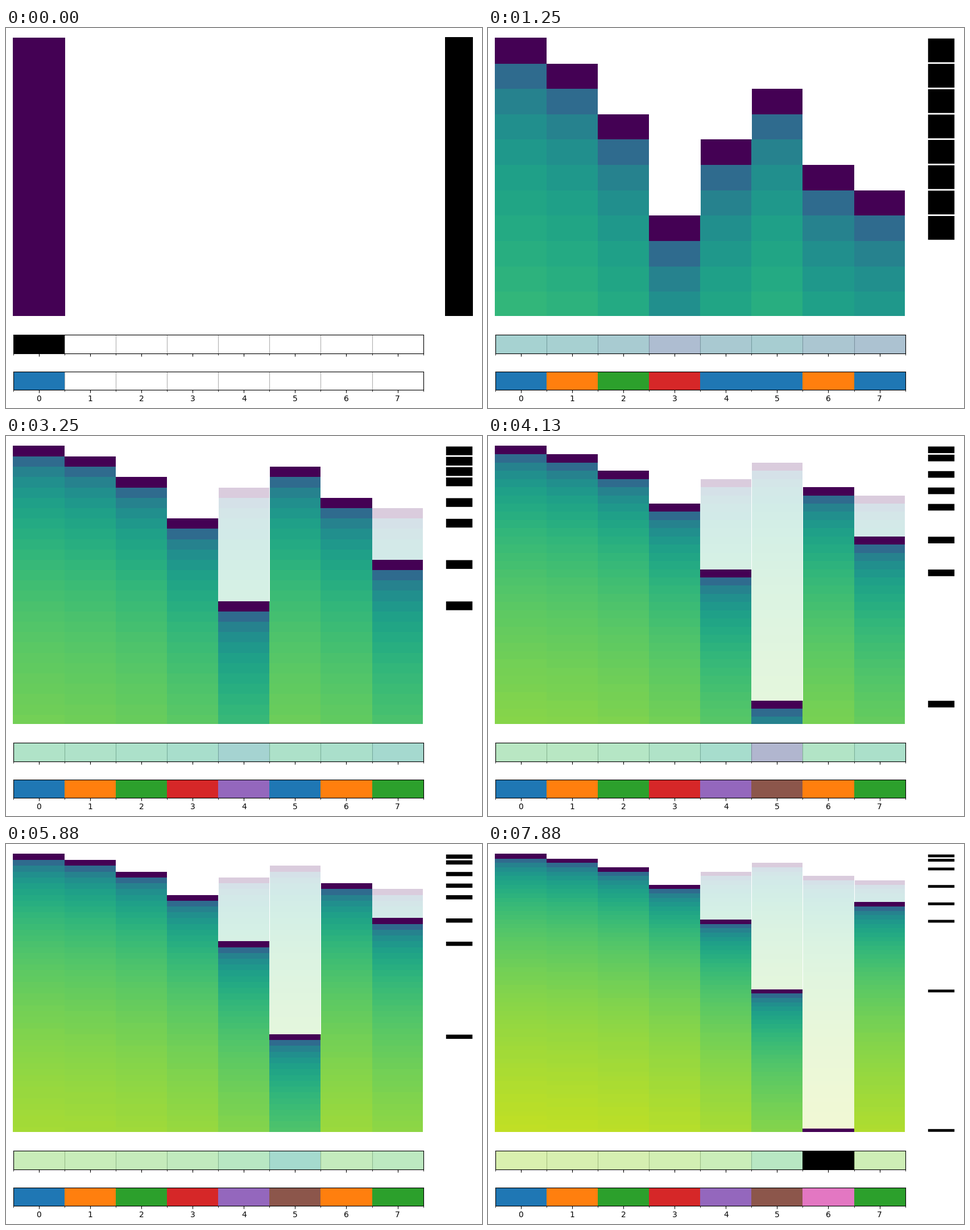
Recreate the animation shown at these times as a matplotlib script. Size 837 by 669 pixels, loop 8000 ms.

```python
import matplotlib.pyplot as plt
import numpy as np
from matplotlib.animation import FuncAnimation
from matplotlib.colors import LogNorm, SymLogNorm
from matplotlib.patches import Rectangle

W, H, DPI = 837, 669, 100
SLOTS, STEPS = 8, 64

# step -> slot written at that step; all other steps are discarded
WRITES = {0: 0, 1: 1, 2: 5, 3: 2, 4: 4, 5: 6, 6: 7, 7: 3,
          11: 7, 15: 4, 31: 5, 63: 6}

LEFT, RIGHT, TOP, BOTTOM = 12.6, 733.7, 17, 507
SPAN = 491
EDGES = np.round(np.linspace(LEFT, RIGHT, SLOTS + 1))
EDGES[[0, -1]] = 12, 733

viridis, tab10 = plt.get_cmap("viridis"), plt.get_cmap("tab10")
cell_norm = SymLogNorm(linthresh=1, vmin=0, vmax=127, base=10)
strip_norm = LogNorm(vmin=1, vmax=128)
cell_colors = viridis(cell_norm(np.arange(STEPS)))[:, :3]

fig = plt.figure(figsize=((W + 0.001) / DPI, (H + 0.001) / DPI), dpi=DPI,
                 facecolor="white")
stage = fig.add_axes([0, 0, 1, 1])
stage.set(xlim=(0, W), ylim=(H, 0))
stage.axis("off")


def make_strip(top, bottom, labels):
    ax = fig.add_axes([LEFT / W, 1 - bottom / H,
                       (RIGHT - LEFT) / W, (bottom - top) / H])
    ax.set_facecolor("none")
    ax.set_axisbelow(True)
    ax.set_yticks([])
    ax.set_xticks(range(SLOTS))
    ax.set_xticks(np.arange(SLOTS + 1) - 0.5, minor=True)
    ax.tick_params(labelbottom=labels, pad=2.7)
    ax.grid(True, which="minor", axis="x", color="#b0b0b0", lw=0.8)
    bars = ax.bar(range(SLOTS), 1, width=1, color="none", lw=0)
    ax.set(xlim=(-0.5, SLOTS - 0.5), ylim=(0, 1))
    return bars


age_bars = make_strip(540.2, 573.2, False)
rank_bars = make_strip(604.6, 637.2, True)
drawn = []


def add_box(x0, y0, x1, y1, color):
    box = Rectangle((x0, y0), x1 - x0, y1 - y0, fc=color, lw=0,
                    zorder=3, snap=False)
    drawn.append(stage.add_patch(box))


def slot_writes(step):
    writes = [[] for _ in range(SLOTS)]
    for t, slot in WRITES.items():
        if t <= step:
            writes[slot].append(t)
    return writes


def draw_history(step, writes):
    n = step + 1
    rows = np.round(17.9 + np.arange(n + 1) * SPAN / n)
    rows[0], rows[-1] = TOP, BOTTOM
    cols = EDGES.copy()
    cols[1] += step == 0

    rgb = np.ones((n, SLOTS, 3))
    for slot, times in enumerate(writes):
        for t in times:
            faded = t != times[-1]
            end = times[-1] if faded else n
            color = cell_colors[:end - t]
            rgb[t:end, slot] = 0.8 + 0.2 * color if faded else color
    drawn.append(stage.pcolormesh(cols, rows, rgb))

    # hairline gaps beside cells whose left neighbour is empty or faded
    for slot in range(4, SLOTS):
        if not writes[slot]:
            continue
        first, last = writes[slot][0], writes[slot][-1]
        end = writes[slot - 1][-1] if writes[slot - 1] else n
        if last > first:
            end = min(end, last)
        if end > first:
            x = cols[slot]
            add_box(x, rows[first], x + 1, rows[end], "white")


def draw_marks(step, writes):
    if step == 0:
        add_box(772, 16, 821, BOTTOM, "black")
        return
    pitch = SPAN / (step + 1)
    for times in filter(None, writes):
        y = 17.1 + times[-1] * pitch
        add_box(773.8, y + 1.4, 820.2, y + pitch - 1.4, "black")


def draw_strips(step, writes):
    for slot, times in enumerate(writes):
        age_color = rank_color = "none"
        if times:
            t = times[-1]
            age = step - t
            age_color = viridis(strip_norm(age + 1), alpha=0.4) if age else "black"
            trailing_ones = (~t & (t + 1)).bit_length() - 1
            rank_color = tab10(trailing_ones)
        age_bars[slot].set_facecolor(age_color)
        rank_bars[slot].set_facecolor(rank_color)


def update(step):
    while drawn:
        drawn.pop().remove()
    writes = slot_writes(step)
    draw_history(step, writes)
    draw_marks(step, writes)
    draw_strips(step, writes)
    return []


anim = FuncAnimation(fig, update, frames=STEPS, init_func=lambda: [],
                     interval=125, repeat=True, repeat_delay=0, blit=False)
plt.show()
```
